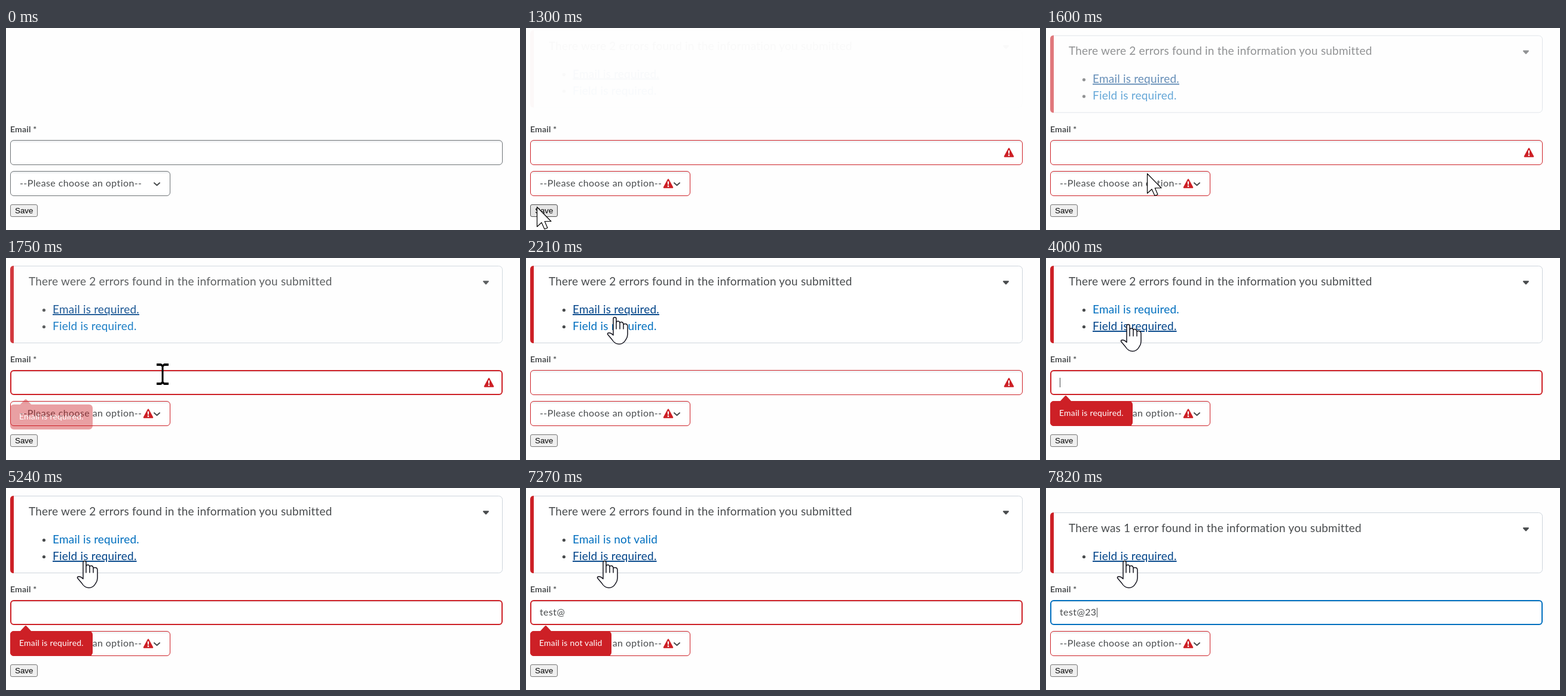
Animation of 860 by 339 pixels, one loop 8 s. Source, as an HTML page:

```html
<!DOCTYPE html>
<html lang="en">
<head>
<meta charset="utf-8">
<title>Form validation</title>
<style>
  html, body { margin: 0; width: 100%; height: 100%; overflow: hidden; background: #fefefe; }
  svg { display: block; width: 860px; height: 339px; }
  text { font-family: Lato, sans-serif; fill: #494c4e; white-space: pre; }
  .body { font-size: 19px; letter-spacing: .2px; }
  .field { font-size: 16px; letter-spacing: .4px; }
  .small { font-size: 14px; letter-spacing: .2px; }
  .link { fill: #006fbf; }
  .link.on { fill: #004489; text-decoration: underline; }
  .button { font: 13.333px "Liberation Sans", Arial, sans-serif; fill: #000; }
  .pointer { stroke-linejoin: round; }
</style>
</head>
<body>
<svg viewBox="0 0 860 339">
  <defs>
    <g id="warn">
      <path d="M8.5 1.5 15.5 14.5H1.5Z" fill="#cd2026" stroke="#cd2026" stroke-width="2.6" stroke-linejoin="round"/>
      <path d="M7.2 4.6h2.6l-.5 5.6H7.7Z" fill="#fff"/>
      <circle cx="8.5" cy="12.6" r="1.35" fill="#fff"/>
    </g>
  </defs>

  <g id="alert">
    <rect id="alertBox" x="7.5" width="823" rx="6" fill="#fff" stroke="#cdd5dc"/>
    <path id="alertBar" fill="#cd2026"/>
    <g id="alertHead">
      <text id="heading" class="body" x="38" y="46"></text>
      <path d="M799 39.2h8l-4 4.3Z" fill="#494c4e" stroke="#494c4e" stroke-width="2" stroke-linejoin="round"/>
    </g>
    <g id="emailItem">
      <circle cx="63.5" cy="87.5" r="2.6" fill="#494c4e"/>
      <text id="emailLink" class="body link" x="78" y="93"></text>
    </g>
    <circle cx="63.5" cy="115.5" r="2.6" fill="#494c4e"/>
    <text id="fieldLink" class="body link" x="78" y="121">Field is required.</text>
  </g>

  <text class="small" x="7" y="175" font-weight="700">Email *</text>
  <rect x="7" y="188" width="824" height="42" rx="6" fill="#fff"/>
  <path d="M9 190.5H829" stroke="#b1b9be" stroke-opacity=".25" stroke-width="2"/>
  <rect id="inputBox" fill="none"/>
  <text id="typed" class="field" x="23" y="214"></text>
  <rect id="caret" y="201" width="1" height="16" fill="#494c4e"/>
  <use id="inputWarn" href="#warn" x="799.5" y="201"/>

  <rect x="7" y="240" width="268" height="42" rx="6" fill="#fff"/>
  <path d="M9 242.5H273" stroke="#b1b9be" stroke-opacity=".25" stroke-width="2"/>
  <rect id="selectBox" x="7.5" y="240.5" width="267" height="41" rx="5.5" fill="none"/>
  <text class="field" x="23" y="266">--Please choose an option--</text>
  <use id="selectWarn" href="#warn" x="229.5" y="253"/>
  <path d="M248 260l4.5 4 4.5-4" fill="none" stroke="#494c4e" stroke-width="2" stroke-linecap="round" stroke-linejoin="round"/>

  <rect id="save" x="7.5" y="296.5" width="45" height="20" rx="2.5"/>
  <text class="button" x="15" y="311">Save</text>

  <g id="tip">
    <path d="M23 241 31.6 231.8Q33 230.4 34.4 231.8L43 241Z" fill="#cd2026"/>
    <rect id="tipBox" x="7" y="240" height="42" rx="6" fill="#cd2026"/>
    <text id="tipText" class="small" x="22" y="265" style="fill:#fff"></text>
  </g>

  <circle id="click" r="30" fill="#fdf000" opacity=".7"/>
  <g id="cursor">
    <path id="arrow" class="pointer" d="M.5.5V33.5L8 26.5 13 37.5 18 35.5 13.3 24.5H24Z" fill="#fff" stroke="#000" stroke-width="1.2"/>
    <path id="beam" class="pointer" d="M-10-18h7.5L0-16 2.5-18H10v4H3L1.5-12.5V12.5L3 14h7v4H2.5L0 16-2.5 18H-10V14h7L-1.5 12.5V-12.5L-3-14h-7Z" fill="#000"/>
    <path id="hand" class="pointer" d="M-2 3Q-2 .5.5.5 3 .5 3 3V10Q3 7 6 7 9 7 9 11 9 8 12 8.5 15 9 15 13 15.5 11 18.5 11.5 22 12 22 16V29Q22 34 19 38 15 45.5 7.5 45.5 0 45-4 38L-11.5 29Q-12 26.5-8.5 26.5-5 27-2 30.5ZM3 10V20M9 11V20M15 13V20" fill="#fff" stroke="#15151f" stroke-width="1.5" stroke-linecap="round"/>
  </g>
</svg>
<script>
const LOOP = 8000;
const RED = '#cd2026', BLUE = '#006fbf', GRAY = '#6e7376';
const el = {};
document.querySelectorAll('[id]').forEach(e => el[e.id] = e);

// time, x, y of the pointer tip
const PATH = [
  [140, 441, 334], [370, 262, 316], [600, 106, 300], [760, 38, 294], [900, 21, 298],
  [980, 20, 298], [1060, 18, 300], [1360, 18, 300], [1560, 130, 262], [1680, 245, 208],
  [1750, 262, 195], [1830, 225, 165], [1980, 149, 112], [2140, 148, 108], [2290, 149, 90],
  [3750, 149, 90], [4130, 131, 122]
];
const KEYS = [[6110, 't'], [6260, 'e'], [6340, 's'], [6490, 't'], [6720, '@'], [7340, '2'], [7820, '3']];
const BLINKS = [3680, 4230, 4780, 5240, 5790, 7270, 7340];

const clamp = v => Math.max(0, Math.min(1, v));
const progress = (t, start, length) => clamp((t - start) / length);
const easeOut = p => 1 - (1 - p) ** 3;
const within = (v, a, b) => v >= a && v < b;
const show = (e, on) => e.setAttribute('display', on ? 'inline' : 'none');

function set(e, attrs) {
  for (const k in attrs) e.setAttribute(k, attrs[k]);
}

function say(e, text) {
  if (e.textContent !== text) e.textContent = text;
}

function pointerAt(t) {
  const i = PATH.findIndex(p => p[0] > t);
  if (i === 0) return PATH[0].slice(1);
  if (i < 0) return PATH[PATH.length - 1].slice(1);
  const [t0, x0, y0] = PATH[i - 1], [t1, x1, y1] = PATH[i];
  const p = (t - t0) / (t1 - t0);
  return [Math.round(x0 + (x1 - x0) * p), Math.round(y0 + (y1 - y0) * p)];
}

function drawAlert(t, single, invalid, hoverEmail, hoverField) {
  const p = progress(t, 1290, 520);
  const top = single ? 41 : 13;
  set(el.alert, { opacity: p, transform: `translate(0 ${-10 * (1 - easeOut(p))})` });
  set(el.alertBox, { y: top + .5, height: 129 - (top - 13) });
  set(el.alertBar, { d: `M13 ${top}V143Q7 143 7 137V${top + 6}Q7 ${top} 13 ${top}Z` });
  set(el.alertHead, { transform: `translate(0 ${top - 13})` });
  say(el.heading, `There ${single ? 'was 1 error' : 'were 2 errors'} found in the information you submitted`);
  say(el.emailLink, invalid);
  show(el.emailItem, !single);
  el.emailLink.classList.toggle('on', hoverEmail || t < 3680);
  el.fieldLink.classList.toggle('on', hoverField);
}

function drawInput(t, text, failed, focused, hovered) {
  const thick = focused || hovered ? 2 : 1;
  set(el.inputBox, {
    x: 7 + thick / 2, y: 188 + thick / 2, width: 824 - thick, height: 42 - thick, rx: 6 - thick / 2,
    'stroke-width': thick, stroke: failed ? RED : focused ? BLUE : GRAY
  });
  say(el.typed, text);
  const width = text ? el.typed.getComputedTextLength() : 0;
  set(el.caret, { x: Math.round(23 + width) });
  show(el.caret, BLINKS.filter(b => b <= t).length % 2 === 1);
  show(el.inputWarn, failed && !focused);
}

function drawTip(t, message, visible) {
  const p = easeOut(progress(t, t < 3000 ? 1718 : 3760, 200));
  show(el.tip, visible && p > 0);
  say(el.tipText, message);
  set(el.tipBox, { width: Math.round(el.tipText.getComputedTextLength() + 30) });
  set(el.tip, { opacity: p, transform: `translate(0 ${10 * (1 - p)})` });
}

function draw(t) {
  const [x, y] = pointerAt(t);
  const onLink = within(x, 78, 222);
  const hoverEmail = onLink && within(y, 78, 104);
  const hoverField = onLink && within(y, 104, 126);
  const hoverInput = within(t, 1300, 2000) && within(y, 188, 230);
  const hoverSave = t >= 140 && within(x, 7, 53) && within(y, 296, 317);
  const text = KEYS.filter(k => k[0] <= t).map(k => k[1]).join('');
  const sent = t >= 1210, focused = t >= 3680, single = t >= 7340;
  const message = text ? 'Email is not valid' : 'Email is required.';

  drawAlert(t, single, message, hoverEmail, hoverField);
  drawInput(t, text, sent && !single, focused, hoverInput);
  drawTip(t, message, hoverInput || (focused && !single));
  set(el.selectBox, { stroke: sent ? RED : GRAY });
  show(el.selectWarn, sent);
  set(el.save, { fill: hoverSave ? '#e5e5e5' : '#efefef', stroke: hoverSave ? '#4f4f4f' : '#767676' });

  show(el.click, within(t, 1210, 1300) || within(t, 3530, 3680));
  set(el.click, { cx: x, cy: y });
  show(el.cursor, t >= 140);
  set(el.cursor, { transform: `translate(${x} ${y})` });
  const hand = hoverEmail || hoverField;
  show(el.hand, hand);
  show(el.beam, hoverInput);
  show(el.arrow, !hand && !hoverInput);
}

const start = performance.now();
function tick() {
  draw((performance.now() - start) % LOOP);
  requestAnimationFrame(tick);
}
draw(0);
requestAnimationFrame(tick);
</script>
</body>
</html>
```
